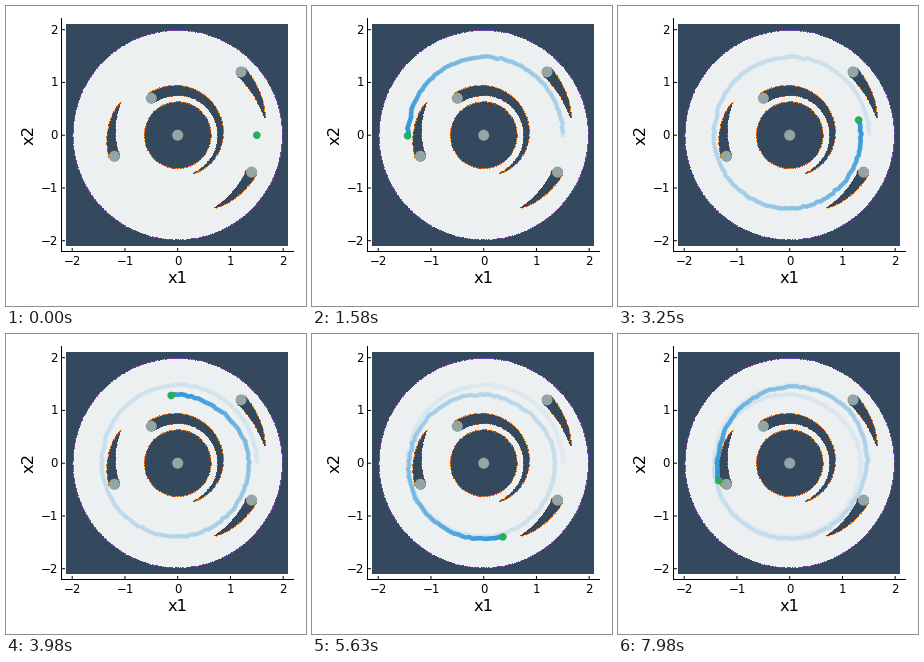
Recreate the animation shown at these times as a matplotlib script. Size 300 by 300 pixels, loop 8 s.

```python
import numpy as np
import matplotlib.pyplot as plt
from matplotlib.animation import FuncAnimation
from matplotlib.collections import LineCollection
from matplotlib.colors import to_rgb

SIZE, DPI = 300, 100
FRAMES, INTERVAL = 320, 25
PT = 72 / DPI

# Pixel geometry: data origin, pixels per unit, and the region map's box
CX, CY, UNIT = 171.7, 129.2, 52.75
WEST, EAST, NORTH, SOUTH = 60, 282, 18, 240

DARK, LIGHT, GREY = "#34495e", "#ecf0f1", "#95a5a6"
BLUE, GREEN = "#3498db", "#27ae60"
WARM = ["#e67e22", "#d35400", "#c0392b", "#f39c12"]
COOL = ["#9b59b6", "#8e44ad", "#5b4bc4", "#34495e"]

OUTER, INNER = 1.985, 0.633
EDGE = 0.0095         # half a pixel in data units
HALF, TAPER = 0.11, 0.65
DRIFT = 0.0004        # inward drift of a tail per degree

# dot x, dot y, length of its tail in degrees
OBSTACLES = [(-0.5, 0.7, 195), (1.2, 1.2, 34), (-1.2, -0.4, 49), (1.4, -0.7, 37)]

# frame, orbit radius
ORBIT = [(0, 1.5), (35, 1.48), (101, 1.38), (130, 1.34), (145, 1.27),
         (159, 1.3), (198, 1.45), (240, 1.42), (265, 1.505), (310, 1.36),
         (320, 1.39)]
SPEED = 0.05          # radians per frame

rng = np.random.default_rng(4)


def px(x, y):
    return CX + UNIT * x, CY - UNIT * y


def paint(img, mask, names):
    palette = np.array([to_rgb(n) for n in names])
    img[mask] = palette[rng.integers(len(names), size=mask.sum())]


def make_map():
    cols = np.arange(WEST, EAST) + 0.5
    rows = np.arange(NORTH, SOUTH) + 0.5
    gx, gy = np.meshgrid((cols - CX) / UNIT, (CY - rows) / UNIT)
    r, theta = np.hypot(gx, gy), np.degrees(np.arctan2(gy, gx))
    luck = rng.random(r.shape)

    img = np.empty(r.shape + (3,))
    img[:] = to_rgb(LIGHT)
    img[(r > OUTER) | (r < INNER)] = to_rgb(DARK)
    paint(img, (abs(r - OUTER) < EDGE) & (luck < 0.85), COOL)
    paint(img, (abs(r - INNER) < EDGE) & (luck < 0.85), WARM)

    # Each dot drags a tapering tail clockwise along its circle
    for x, y, length in OBSTACLES:
        swept = (np.degrees(np.arctan2(y, x)) - theta) % 360
        inside = swept <= length
        width = HALF * np.clip(1 - swept / length, 0, 1) ** TAPER
        off = r - (np.hypot(x, y) - DRIFT * swept)
        head = np.hypot(gx - x, gy - y) < 0.1
        img[inside & (abs(off) < width) | head] = to_rgb(DARK)
        paint(img, inside & (abs(off - width) < EDGE) & (luck < 0.85), WARM)
        paint(img, inside & (abs(off + width) < EDGE) & (luck < 0.3), WARM)
    return img


def make_path():
    k = np.arange(FRAMES)
    radius = np.interp(k, *zip(*ORBIT))
    radius[1:] += rng.normal(0, 0.008, FRAMES - 1)
    angle = SPEED * k
    return np.column_stack(px(radius * np.cos(angle), radius * np.sin(angle)))


fig = plt.figure(figsize=(SIZE / DPI, SIZE / DPI), dpi=DPI, facecolor="white")
ax = fig.add_axes([0, 0, 1, 1])
ax.axis("off")
ax.imshow(make_map(), extent=(WEST, EAST, SOUTH, NORTH), aspect="auto",
          interpolation="nearest", zorder=1)
ax.set_xlim(0, SIZE)
ax.set_ylim(SIZE, 0)


def line(x0, y0, x1, y1):
    ax.plot([x0, x1], [y0, y1], color="black", lw=PT, zorder=3,
            solid_capstyle="butt", snap=False)


def disc(x, y, radius, color, z):
    dot = plt.Circle((x, y), radius, fc=color, ec="none", zorder=z)
    return ax.add_patch(dot)


def label(x, y, text, size, ha="center", **style):
    ax.text(x, y, text, fontsize=size, family="DejaVu Sans", ha=ha,
            va="baseline", **style)


# Axes, ticks and labels
LEFT, RIGHT, TOP, BOTTOM = 55.5, 288, 12, 245.5
line(LEFT, TOP, LEFT, BOTTOM + 0.5)
line(LEFT, BOTTOM, RIGHT, BOTTOM)
for v in range(-2, 3):
    tx, ty = px(v, v)
    text = str(v).replace("-", "\u2212")
    line(tx, BOTTOM, tx, BOTTOM - 3.5)
    line(LEFT, ty, LEFT + 3.5, ty)
    label(tx, 258.6, text, 8.5)
    label(52, ty + 4, text, 8.5, ha="right")
label(172, 277, "x1", 11.7)
label(28, 129, "x2", 11.7, rotation=90, rotation_mode="anchor")

for x, y in [(0, 0)] + [o[:2] for o in OBSTACLES]:
    disc(*px(x, y), 5.5, GREY, 4)

# Moving point with a fading trail
path = make_path()
segments = np.stack([path[:-1], path[1:]], axis=1)
colors = np.ones((FRAMES - 1, 4))
colors[:, :3] = to_rgb(BLUE)
trail = LineCollection(segments, linewidths=4.6 * PT, capstyle="round", zorder=5)
ax.add_collection(trail, autolim=False)
ball = disc(*path[0], 3.8, GREEN, 6)


def update(k):
    age = k - 1 - np.arange(FRAMES - 1)
    fade = (1 + np.maximum(age, 0) / 30) ** -1.6
    colors[:, 3] = np.where(age >= 0, fade, 0)
    trail.set_color(colors.copy())
    ball.center = tuple(path[k])
    return trail, ball


anim = FuncAnimation(fig, update, frames=FRAMES, interval=INTERVAL,
                     init_func=lambda: update(0), repeat=True, repeat_delay=0)
plt.show()
```
